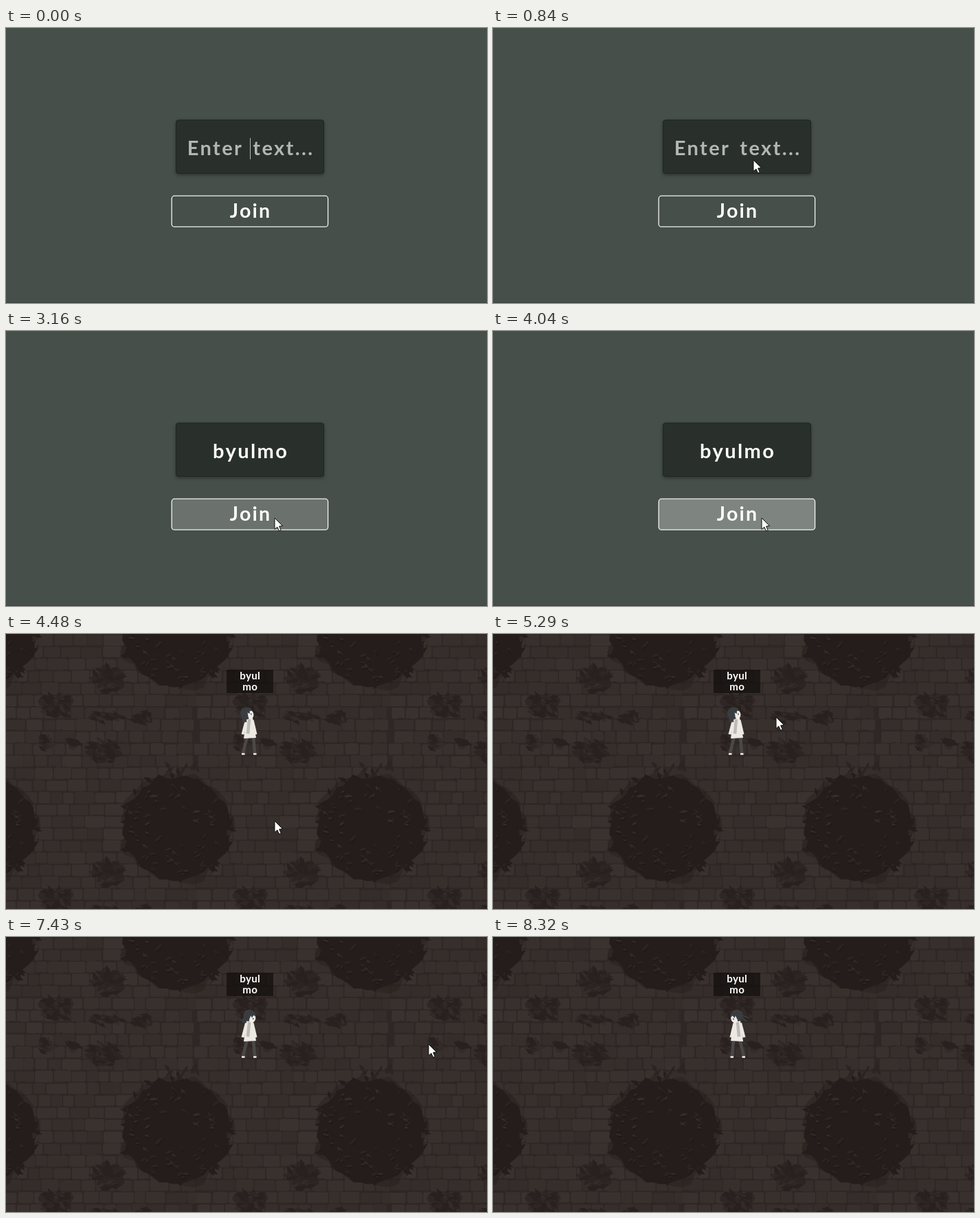
An HTML page with a canvas for the animation above (8380 ms loop, 700 by 400 pixels).

```html
<!DOCTYPE html>
<html lang="en">
<head>
<meta charset="utf-8">
<title>Join screen</title>
<style>
  html, body { margin: 0; width: 100%; height: 100%; overflow: hidden; background: #464f49; }
  canvas { display: block; width: 100vw; height: 100vh; }
</style>
</head>
<body>
<canvas id="stage" width="700" height="400"></canvas>
<script>
const W = 700, H = 400, LOOP = 8380, GAME_START = 4480;
const TILE_W = 283, TILE_H = 282, TAU = Math.PI * 2;
const NAME = 'byulmo';
const KEY_TIMES = [1140, 1410, 1540, 1970, 2070, 2170];
const FONT = 'Lato, "Open Sans", sans-serif';
const ctx = document.getElementById('stage').getContext('2d');

// Cursor stops as [time, x, y], eased in between.
const STOPS = [[140, 552, 392], [840, 379, 192], [2980, 379, 192], [3160, 391, 272],
  [GAME_START, 391, 272], [5290, 412, 121], [5700, 435, 198], [6250, 553, 95],
  [6960, 119, 190], [7430, 615, 156], [7560, 685, 230], [7840, 200, 402]];

const clamp = v => Math.min(1, Math.max(0, v));
const lerp = (a, b, u) => a + (b - a) * u;

function cursorAt(t) {
  const i = Math.max(1, STOPS.findIndex(s => s[0] > t));
  const [t0, x0, y0] = STOPS[i - 1], [t1, x1, y1] = STOPS[i];
  const u = clamp((t - t0) / (t1 - t0)), eased = u * u * (3 - 2 * u);
  return [lerp(x0, x1, eased), lerp(y0, y1, eased)];
}

let seed = 1;
const rand = (a = 0, b = 1) => {
  seed = seed * 16807 % 2147483647;
  return lerp(a, b, seed / 2147483647);
};

function poly(c, points, fill) {
  c.beginPath();
  points.forEach(([x, y]) => c.lineTo(x, y));
  c.closePath();
  c.fillStyle = fill;
  c.fill();
}

function ellipse(c, x, y, rx, ry, fill) {
  c.beginPath();
  c.ellipse(x, y, rx, ry, 0, 0, TAU);
  c.fillStyle = fill;
  c.fill();
}

function roundRect(c, x, y, w, h, r) {
  c.beginPath();
  c.roundRect(x, y, w, h, r);
}

// Ragged outline, slightly octagonal.
function ragged(c, x, y, rx, ry, n, rough, fill) {
  const points = Array.from({ length: n }, (_, i) => {
    const a = i / n * TAU, r = 1 + .025 * Math.cos(8 * a + Math.PI) - rand(0, rough);
    return [x + Math.cos(a) * rx * r, y + Math.sin(a) * ry * r];
  });
  poly(c, points, fill);
}

function leaf(c, x, y, size, angle, fill) {
  const dx = Math.cos(angle) * size, dy = Math.sin(angle) * size;
  poly(c, [[x - dx, y - dy], [x - dy * .5, y + dx * .5], [x + dx, y + dy], [x + dy * .3, y - dx * .3]], fill);
}

function drawBricks(c) {
  const rowH = TILE_H / 16;
  for (let y = 0; y < TILE_H - 1; y += rowH) {
    for (let x = rand(-12, 0); x < TILE_W - 12;) {
      const w = rand(16, 32), v = rand(-3, 2), top = y + rand(0, 2);
      c.fillStyle = `rgb(${56 + v},${48 + v},${45 + v})`;
      roundRect(c, x + rand(.3, 1.2), top, w - rand(.8, 2), y + rowH - rand(0, 1.5) - top, 3);
      c.fill();
      if (rand() < .4) leaf(c, x + rand(0, w), y + rowH, rand(3, 7), rand(-.5, .5), '#2d2624');
      x += w;
    }
  }
}

function drawBush(c, x, y) {
  const dark = '#251d1b';
  ragged(c, x, y, 88, 87, 40, .16, 'rgba(37,29,27,.4)');
  ragged(c, x, y, 81, 80, 50, .09, dark);
  for (let i = 0; i < 26; i++) {
    const a = rand(0, TAU), r = rand(72, 82);
    leaf(c, x + Math.cos(a) * r, y + Math.sin(a) * r, rand(5, 10), a + rand(-1, 1), dark);
  }
  for (let i = 0; i < 70; i++) {
    const a = rand(0, TAU), r = 70 * Math.sqrt(rand(.12, 1)), turn = rand(-1.1, 1.1);
    const lx = x + Math.cos(a) * r, ly = y + Math.sin(a) * r;
    leaf(c, lx, ly, rand(3, 7), turn, rand() < .6 ? '#2d2523' : '#362d2a');
    leaf(c, lx + 1, ly + 2.5, 4, turn, '#221a19');
  }
  for (let i = 0; i < 9; i++)
    leaf(c, x + rand(-15, 32), y - rand(78, 92), rand(4, 9), rand(-2.6, -.5), '#2c2422');
}

function drawClump(c, x, y, rx, ry) {
  ragged(c, x, y, rx * 1.1, ry * 1.1, 22, .5, 'rgba(40,32,30,.6)');
  const slant = rand(.2, .8);
  for (let i = 0; i < rx * ry / 22 + 5; i++) {
    const a = rand(0, TAU), r = Math.sqrt(rand(0, .8));
    leaf(c, x + Math.cos(a) * r * rx, y + Math.sin(a) * r * ry, rand(4, 10), slant + rand(-.8, .8),
      rand() < .78 ? '#29211f' : '#332b29');
  }
}

function drawPlants(c) {
  drawBush(c, 248, 282);
  for (const [x, y, rx, ry] of [[148, 64, 27, 22], [73, 103, 27, 19], [145, 120, 28, 8],
    [199, 122, 13, 12], [58, 157, 12, 12], [98, 159, 8, 8], [142, 171, 28, 19]])
    drawClump(c, x, y, rx, ry);
}

function makeWall() {
  const wall = document.createElement('canvas');
  wall.width = W;
  wall.height = H;
  const c = wall.getContext('2d');
  c.fillStyle = '#2e2725';
  c.fillRect(0, 0, W, H);
  for (const draw of [drawBricks, drawPlants])
    for (let y = -TILE_H; y < H; y += TILE_H)
      for (let x = -TILE_W; x < W; x += TILE_W) {
        seed = 4711;
        c.save();
        c.translate(x, y);
        draw(c);
        c.restore();
      }
  return wall;
}
const wall = makeWall();

function text(str, x, y, size, fill, spacing) {
  ctx.font = `700 ${size}px ${FONT}`;
  ctx.letterSpacing = spacing + 'px';
  ctx.wordSpacing = size * .16 + 'px';
  ctx.textAlign = 'center';
  ctx.fillStyle = fill;
  ctx.fillText(str, x + spacing / 2, y);
  return ctx.measureText(str).width;
}

function drawCursor(x, y) {
  ctx.save();
  ctx.translate(x, y);
  ctx.lineWidth = 1;
  ctx.strokeStyle = '#111';
  poly(ctx, [[0, 0], [0, 16.5], [3.8, 13], [6.6, 19], [9.2, 17.8], [6.6, 12], [11.6, 11.6]], '#fff');
  ctx.stroke();
  ctx.restore();
}

function drawMenu(t) {
  ctx.fillStyle = '#464f49';
  ctx.fillRect(0, 0, W, H);
  ctx.fillStyle = '#3c443f';
  ctx.fillRect(0, 399, W, 1);

  ctx.save();
  ctx.shadowColor = 'rgba(0,0,0,.35)';
  ctx.shadowBlur = 5;
  ctx.shadowOffsetY = 2;
  ctx.fillStyle = '#29302c';
  roundRect(ctx, 247, 133.5, 216, 78.5, 4);
  ctx.fill();
  ctx.restore();
  ctx.lineWidth = 1;
  ctx.strokeStyle = '#1f2622';
  roundRect(ctx, 247.5, 134, 215, 77.5, 4);
  ctx.stroke();

  const pressed = KEY_TIMES.filter(k => t >= k);
  const typed = NAME.slice(0, pressed.length);
  const color = typed ? '#fff' : '#b3b7b4';
  const width = text(typed || 'Enter text...', 355, 185, 29, color, 2.4);
  const sinceKey = t - (pressed.at(-1) || 0);
  if (t < 3900 && sinceKey % 1200 < 580) {
    ctx.fillStyle = color;
    ctx.fillRect(355 + (typed && Math.round(width / 2)), 160, 1, 31);
  }

  const glow = .2 * clamp((t - 3020) / 140) + .1 * clamp((t - 3900) / 140);
  roundRect(ctx, 241.2, 244.2, 227.4, 45, 4);
  ctx.fillStyle = `rgba(255,255,255,${glow})`;
  ctx.fill();
  ctx.lineWidth = 1.3;
  ctx.strokeStyle = '#f4f5f4';
  ctx.stroke();
  text('Join', 355, 276, 28.5, '#fff', 2.3);
}

function limb(x1, y1, x2, y2, width, color) {
  ctx.beginPath();
  ctx.moveTo(x1, y1);
  ctx.lineTo(x2, y2);
  ctx.lineWidth = width;
  ctx.strokeStyle = color;
  ctx.stroke();
}

function drawCharacter(t, cursorX) {
  const hair = '#3a3d40', coat = '#ece8e2';
  const tilt = -.38 + .63 * Math.sqrt(clamp((t - 5290) / 3030));
  const swing = clamp((380 - cursorX) / 180);
  ctx.save();
  ctx.translate(355, 176);
  if (cursorX < 355) ctx.scale(-1, 1);

  for (const [hip, foot] of [[-4, -10], [5, 7]]) {
    limb(hip, -27, foot, -3, 4.5, '#4a4848');
    limb(foot - 2, -1.5, foot + 2.5, -1.5, 2.5, '#f1efeb');
  }
  poly(ctx, [[-5, -54], [4, -54], [9, -25], [-9, -24]], coat);
  limb(-1, -52, -3, -31, 4.5, '#bdb9b4');
  limb(-5, -51, -10.5, -30, 4, coat);
  limb(4, -51, 9, -30, 3, coat);

  // The head turns around the neck.
  ctx.translate(-1, -53);
  ctx.rotate(tilt);
  ctx.lineCap = 'round';
  const tailX = lerp(-9, -17, swing), tailY = lerp(1, -1, swing);
  limb(-6, -9, tailX, tailY, lerp(4, 2, swing), hair);
  limb(-5, -8, lerp(-6, -12, swing), 2, 2.5, hair);
  ellipse(ctx, -1, -9, 9, 8.5, hair);
  ellipse(ctx, 3.5, -5.5, 5, 6.5, '#f0ece7');
  poly(ctx, [[-5, -14], [7, -14], [9, -8], [5, -10], [3, -6], [1, -9], [-1, 0], [-6, 0]], hair);
  ellipse(ctx, 5, -5, .8, 1.3, '#4a4a4c');
  ctx.restore();
}

function drawGame(t, cursorX) {
  ctx.drawImage(wall, 0, 0);
  drawCharacter(t, cursorX);
  ctx.fillStyle = 'rgba(16,12,11,.68)';
  ctx.fillRect(321, 52, 68, 34);
  text(NAME.slice(0, 4), 355, 66, 15, '#fff', .4);
  text(NAME.slice(4), 355, 81.5, 15, '#fff', .4);
}

function frame(now) {
  const t = now % LOOP, gone = t >= 7840;
  const [x, y] = gone ? STOPS.at(-1).slice(1) : cursorAt(t);
  if (t >= GAME_START) drawGame(t, x);
  else drawMenu(t);
  if (t >= 140 && !gone) drawCursor(x, y);
  requestAnimationFrame(frame);
}
requestAnimationFrame(frame);
</script>
</body>
</html>
```
